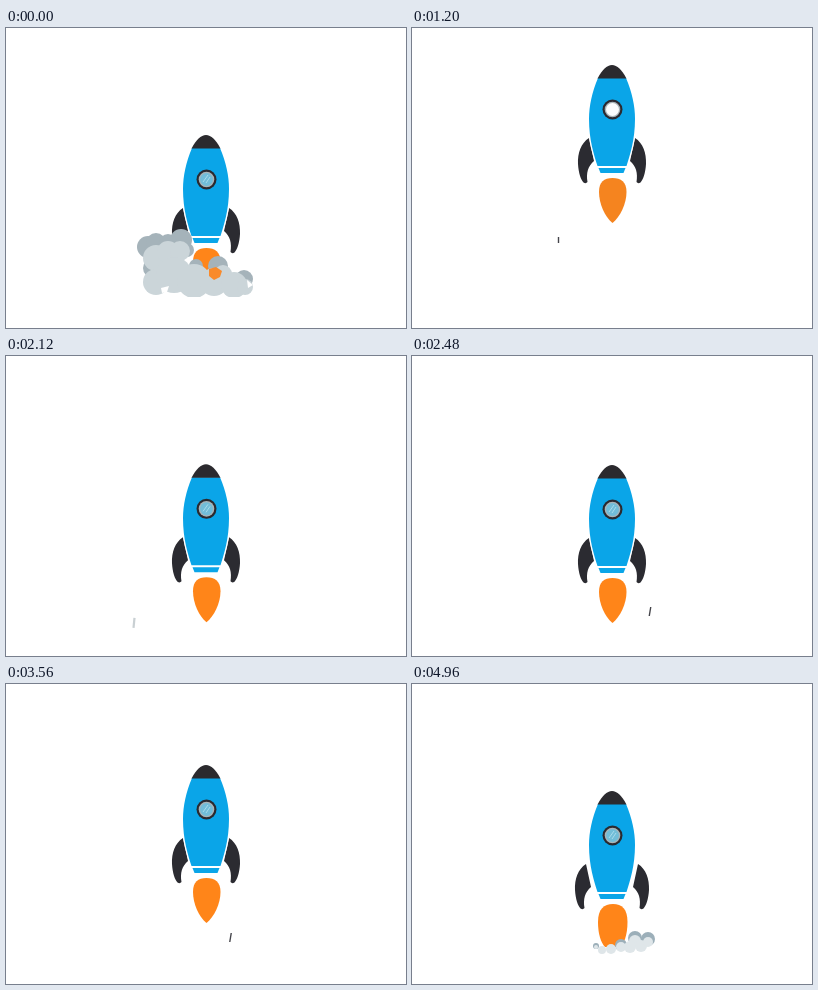
An HTML page for the animation above (5000 ms loop, 400x300 px).

```html
<!DOCTYPE html>
<html lang="en">
<head>
<meta charset="utf-8">
<title>Rocket</title>
<style>
html, body { margin: 0; width: 100%; height: 100%; overflow: hidden; background: #fff; }
svg { display: block; width: 100vw; height: 100vh; }
</style>
</head>
<body>
<svg viewBox="0 0 400 300">
  <g id="streaks" stroke-linecap="butt"></g>
  <ellipse id="seed" cx="200" cy="180.5" rx="2.7" ry="5.5" fill="#e2e3e4"/>
  <g id="rocket">
    <path id="flame" fill="#ff8519"/>
    <path id="finL" fill="#2b2b31" d="M-23 73C-31 78 -34.500 88 -34 99C-33.500 108 -31 115 -28.500 117.500Q-26 119 -24.500 117C-26 108 -24 101 -18 96Z"/>
    <path id="finR" fill="#2b2b31" d="M23 73C31 78 34.500 88 34 99C33.500 108 31 115 28.500 117.500Q26 119 24.500 117C26 108 24 101 18 96Z"/>
    <path fill="#fff" d="M-14 13C-21 28 -24.500 42 -24.500 54C-24.500 75 -19 91 -15 103L-12 109H12L15 103C19 91 24.500 75 24.500 54C24.500 42 21 28 14 13Z"/>
    <path fill="#0aa5e8" d="M-14 13C-20 27 -23 41 -23 54C-23 75 -18 90 -14.500 101H14.500C18 90 23 75 23 54C23 41 20 27 14 13Z"/>
    <path fill="#0aa5e8" d="M-13.500 103H13.500L11.500 108H-11.500Z"/>
    <path fill="#2b2a2e" d="M-14.500 13.500C-10 5 -5 0 0 0C5 0 10 5 14.500 13.500Z"/>
    <circle cx="0.500" cy="44.500" r="10" fill="#2a2a30"/>
    <circle cx="0.500" cy="44.500" r="7.800" fill="#a9b4b8"/>
    <circle id="glass" cx="0.500" cy="44.500" r="6.500"/>
    <path id="glint" d="M-3 47L2 40M0 48L4 42" stroke="#a8dcec" stroke-width="1"/>
  </g>
  <clipPath id="ground"><rect x="120" y="190" width="140" height="79"/></clipPath>
  <g id="cloud" clip-path="url(#ground)"></g>
  <g id="sparks">
    <path fill="#f98a2b" d="M203 241L210 239L216 243L214 249L208 252L203 248Z"/>
    <path fill="#fff" d="M155 260L163 258L161 264L156 265ZM241 252L247 257L242 260Z"/>
  </g>
  <g id="puffs"></g>
</svg>
<script>
const LOOP = 5000, STEP = 40;
const $ = id => document.getElementById(id);
const clamp = v => Math.max(0, Math.min(1, v));
const show = (el, on) => el.setAttribute('visibility', on ? 'visible' : 'hidden');

function add(parent, tag, attrs) {
  const el = document.createElementNS('http://www.w3.org/2000/svg', tag);
  for (const k in attrs) el.setAttribute(k, attrs[k]);
  return parent.appendChild(el);
}

const circles = (parent, fill, list) =>
  list.map(([cx, cy, r]) => ({ r, el: add(parent, 'circle', { cx, cy, r, fill }) }));

// Launch smoke: shaded rim, then the lighter body
const cloud = [
  ...circles($('cloud'), '#a5b3ba', [
    [142, 219, 11], [150, 215, 10], [175, 212, 11], [162, 215, 9],
    [181, 222, 7], [212, 238, 10], [238, 251, 9], [190, 238, 7], [147, 240, 10]]),
  ...circles($('cloud'), '#cbd5d9', [
    [150, 230, 13], [162, 224, 11], [174, 223, 10], [150, 254, 13], [168, 247, 18],
    [188, 253, 17], [208, 254, 14], [217, 246, 9], [228, 257, 13], [239, 259, 8]])
];

// First small puffs under the nozzle
const puffs = [
  ...circles($('puffs'), '#9cafb9', [[209, 261, 6], [223, 254, 7], [236, 255, 7], [184, 262, 3]]),
  ...circles($('puffs'), '#dfe6e9', [
    [190, 266, 4], [199, 265, 5], [209, 263, 5], [223, 257, 6], [218, 263, 6],
    [229, 262, 6], [236, 258, 5], [184, 263, 2]])
];

// Streaks: mid time, x, y, length, slant, dark
const streaks = [
  [1000, 247, 235, 8, 0, 1], [1200, 146.5, 212, 6, 0, 1], [1480, 127, 240, 9, 1, 0],
  [1800, 165, 253, 11, 1.5, 0], [1800, 221, 277, 12, 1.5, 0], [2140, 128, 270, 10, 1, 0],
  [2480, 238, 255.5, 9, 1.5, 1], [2820, 128, 268, 9, 1, 0], [3160, 242, 250, 9, 1, 1],
  [3560, 224.5, 253.5, 9, 1.5, 1], [3860, 128, 205, 9, 1, 0]
].map(([mid, x, y, len, slant, dark]) => ({
  mid,
  el: add($('streaks'), 'line', {
    x1: x + slant / 2, y1: y - len / 2, x2: x - slant / 2, y2: y + len / 2,
    stroke: dark ? '#44444a' : '#c9d0d3', 'stroke-width': dark ? 1.4 : 2.2
  })
}));

// Height of the nose during the flight
const flight = [
  [840, -160], [1200, 37], [1400, 84], [1800, 97], [1960, 103], [2200, 110], [2480, 109],
  [3080, 90], [3440, 88], [3560, 81], [3640, 41], [4040, -159]
];

function along(keys, t) {
  const last = keys.length - 1;
  let i = 0;
  while (i < last - 1 && t >= keys[i + 1][0]) i++;
  const slope = k => {
    const a = keys[Math.max(0, k - 1)], b = keys[Math.min(last, k + 1)];
    return (b[1] - a[1]) / (b[0] - a[0]);
  };
  const [t0, y0] = keys[i], [t1, y1] = keys[i + 1];
  const d = t1 - t0, u = (t - t0) / d, v = 1 - u;
  return y0 * (1 + 2 * u) * v * v + y1 * u * u * (3 - 2 * u) +
    d * u * v * (slope(i) * v - slope(i + 1) * u);
}

function noseY(t) {
  if (t < 480) return 107 - 270 * Math.pow(t / 480, 1.6);
  if (t > 840 && t < 4040) return along(flight, t);
  return t >= 4280 ? 107 : -200;
}

function popScale(t) {
  if (t < 4280) return 1;
  const c = 2.6, u = clamp((t - 4280) / 520) - 1;
  return 1 + (c + 1) * u ** 3 + c * u * u;
}

const POINTED = 'M0.500 113C9 113 14.500 117 14.500 127C14.500 139 8 152 0.500 158C-7 152 -13 139 -13 127C-13 117 -8 113 0.500 113Z';
const ROUND = 'M1 113C10 113 15.500 118 15.500 131C15.500 144 12 154 7 156H-7C-11 152 -14 143 -14 131C-14 118 -8 113 1 113Z';

function draw(t) {
  const arriving = t >= 4280, descending = t > 840 && t < 1440;
  $('rocket').setAttribute('transform',
    `translate(200 180) scale(${popScale(t)}) translate(0 ${noseY(t) - 180})`);
  show($('rocket'), t < 480 || (t > 840 && t < 4040) || t > 4280);
  show($('seed'), t === 4280);

  const spread = arriving ? 3 : 0;
  $('finL').setAttribute('transform', `translate(${-spread} 0)`);
  $('finR').setAttribute('transform', `translate(${spread} 0)`);
  $('flame').setAttribute('d', arriving ? ROUND : POINTED);
  $('flame').setAttribute('fill', descending ? '#f5841f' : '#ff8519');
  $('glass').setAttribute('fill', descending ? '#fbfdfd' : '#72bdd8');
  show($('glint'), !descending && (t < 480 || t > 840 && t < 4040 || t > 4280));

  const fade = clamp((t - 120) / 360);
  show($('cloud'), t < 480);
  for (const p of cloud) p.el.setAttribute('r', p.r * (1 + 0.2 * clamp(t / 120)) * (1 - fade));
  show($('sparks'), t < 80);

  const grow = clamp((t - 4800) / 160);
  show($('puffs'), grow > 0);
  for (const p of puffs) p.el.setAttribute('r', p.r * grow);

  for (const s of streaks) {
    const dt = t - s.mid;
    show(s.el, Math.abs(dt) <= 150);
    s.el.setAttribute('transform', `translate(0 ${dt * 0.16})`);
  }
}

let start = null;
function tick(now) {
  if (start === null) start = now;
  const t = (now - start + 1) % LOOP;
  draw(Math.floor(t / STEP) * STEP);
  requestAnimationFrame(tick);
}
draw(0);
requestAnimationFrame(tick);
</script>
</body>
</html>
```
